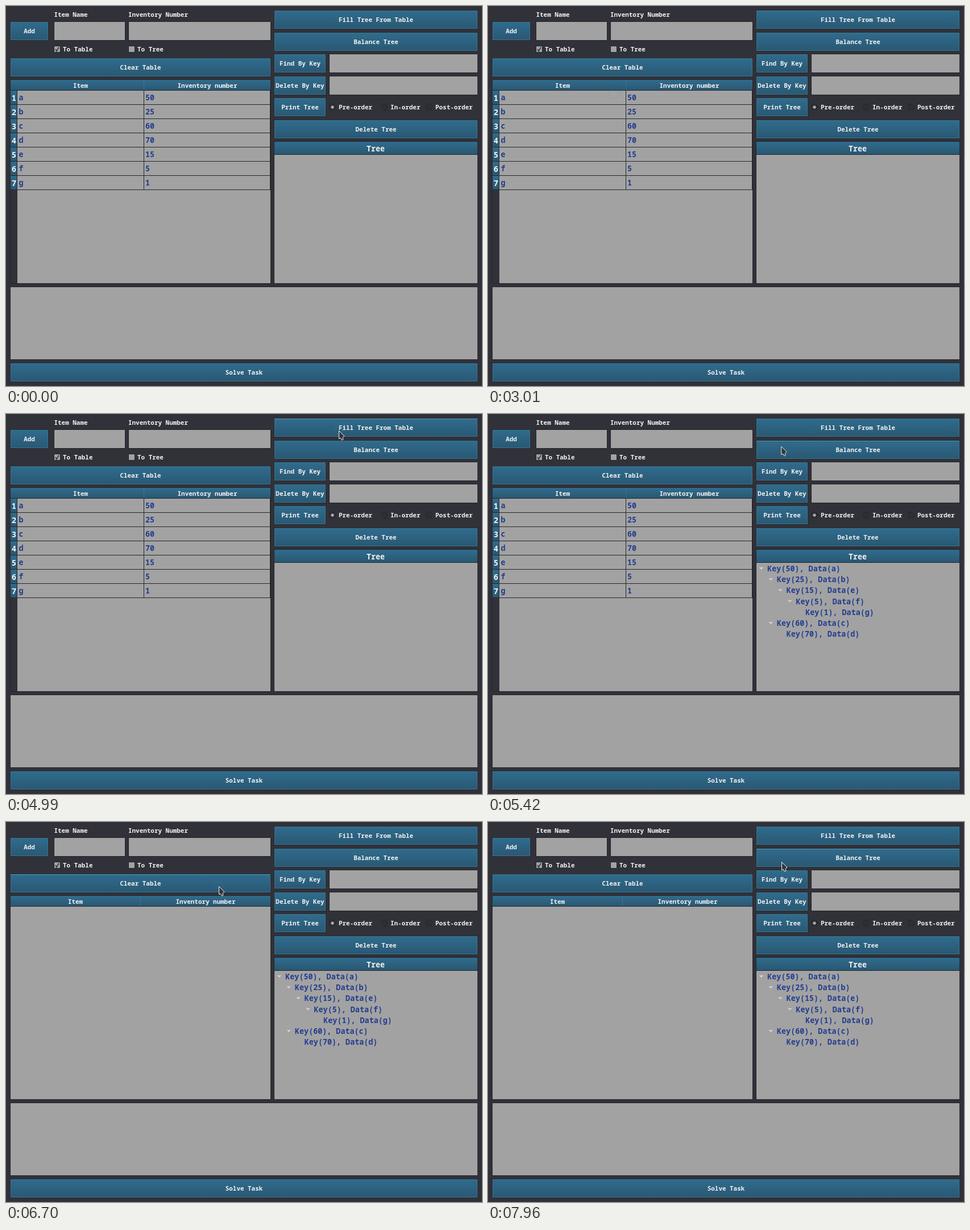
An HTML page with a canvas for the animation above (8 s loop, 837 by 669 pixels).

```html
<!DOCTYPE html>
<html lang="en">
<head>
<meta charset="utf-8">
<title>Tree table tool</title>
<style>
html, body { margin: 0; width: 100%; height: 100%; overflow: hidden; background: #313139; }
canvas { display: block; }
</style>
</head>
<body>
<canvas id="stage" width="837" height="669"></canvas>
<script>
const ctx = document.getElementById('stage').getContext('2d');
const LOOP = 8000, FILL_TIME = 5000, CLEAR_TIME = 6610;
const SMALL = 10.95, LARGE = 13.4;
const GRAY = '#a2a2a2', WHITE = '#f2f2f2', BLUE = '#233d90', DARK = '#25272c', BG = '#313139', EDGE = '#397592';

// Layout: two columns, evenly spaced rows on the right
const LEFT = 8, LEFT_END = 465, RIGHT = 472, RIGHT_END = 829, FIELD = 569, CONTROL = 32;
const rowY = i => Math.round(8 + 38.5 * i);

// Each move eases between two points, sagging by `bow`; `click` is the press before it
const moves = [
  { click: 2560, start: 2640, end: 3020, from: [222, 153], to: [601, -20], bow: 165 },
  { start: 3340, end: 3600, from: [601, -20], to: [585, 29], bow: 0 },
  { click: 4990, start: 5040, end: 6030, from: [585, 29], to: [374, 113], bow: 0 },
  { click: 6600, start: 7120, end: 7940, from: [374, 113], to: [516, 70], bow: 35 }
];

const items = [50, 25, 60, 70, 15, 5, 1].map((key, i) => ({ key, name: 'abcdefg'[i] }));

function insert(node, item) {
  if (!node) return { item };
  const side = item.key < node.item.key ? 'less' : 'more';
  node[side] = insert(node[side], item);
  return node;
}
const root = items.reduce(insert, null);

function pointerAt(t) {
  const move = moves.filter(m => m.start <= t).pop();
  if (!move) return null;
  const { start, end, from, to, bow } = move;
  const u = Math.min(1, (t - start) / (end - start));
  const k = u * u * (3 - 2 * u);
  return [
    from[0] + (to[0] - from[0]) * k,
    from[1] + (to[1] - from[1]) * k + bow * Math.sin(Math.PI * k)
  ];
}

// Share of the last 100 ms spent over the area
function hoverLevel(x, y, w, h, t) {
  let level = 0;
  for (let ago = 0; ago <= 100; ago += 25) {
    const p = pointerAt(t - ago);
    if (p && p[0] >= x && p[0] < x + w && p[1] >= y && p[1] < y + h) level += 0.2;
  }
  return level;
}

function rect(x, y, w, h, color) {
  ctx.fillStyle = color;
  ctx.fillRect(x, y, w, h);
}

function text(str, x, y, size = SMALL, color = WHITE, align = 'left') {
  ctx.font = `bold ${size}px "Noto Sans Mono", monospace`;
  ctx.textAlign = align;
  ctx.fillStyle = color;
  ctx.fillText(str, x, y + size * 0.357);
}

function bluePanel(x, y, w, h) {
  const g = ctx.createLinearGradient(0, y, 0, y + h);
  g.addColorStop(0, '#306c8d');
  g.addColorStop(1, '#295873');
  rect(x, y, w, h, g);
}

function box(x, y, right, bottom) {
  rect(x - 1, y - 1, right - x + 2, bottom - y + 2, DARK);
  rect(x, y, right - x, bottom - y, GRAY);
}

const field = (x, y, right) => box(x, y, right, y + CONTROL);

function disc(x, y, r, color) {
  ctx.beginPath();
  ctx.arc(x, y, r, 0, 7);
  ctx.fillStyle = color;
  ctx.fill();
}

function button(label, x, y, right, t, lit = false) {
  const w = right - x, h = CONTROL;
  rect(x - 1, y - 1, w + 2, h + 2, '#292b31');
  bluePanel(x, y, w, h);
  ctx.strokeStyle = EDGE;
  ctx.lineWidth = 1;
  ctx.strokeRect(x + 0.5, y + 0.5, w - 1, h - 1);
  const level = lit ? 1 : hoverLevel(x, y, w, h, t);
  rect(x, y, w, 1, `rgba(100,170,205,${level * 0.7})`);
  text(label, x + w / 2, y + h / 2, SMALL, WHITE, 'center');
}

function checkbox(label, x, checked) {
  box(x, 71, x + 10, 81);
  if (checked) {
    ctx.strokeStyle = DARK;
    ctx.lineWidth = 1.5;
    ctx.stroke(new Path2D(`M${x + 2} 76l2 3.5l4-7`));
  }
  text(label, x + 15, 76);
}

function radio(label, x, chosen) {
  disc(x, 178, 6, '#27282d');
  disc(x, 178, 5, '#2e2e35');
  if (chosen) disc(x, 178, 2.6, '#b0b0b0');
  text(label, x + 11, 178);
}

function drawTable(cleared) {
  const split = cleared ? 236 : 242, textLeft = cleared ? LEFT : 20;
  box(LEFT, 130, LEFT_END, 488);
  bluePanel(LEFT, 130, LEFT_END - LEFT, 18);
  rect(LEFT, 148, LEFT_END - LEFT, 1, DARK);
  rect(split, 131, 1, 17, EDGE);
  text('Item', (textLeft + split) / 2, 140, SMALL, WHITE, 'center');
  text('Inventory number', (split + LEFT_END) / 2 + 0.5, 140, SMALL, WHITE, 'center');
  if (cleared) return;
  rect(LEFT, 149, 12, 339, BG);
  items.forEach(({ name, key }, i) => {
    const top = 149 + i * 25, mid = top + 12.7;
    bluePanel(LEFT, top, 11, 24);
    rect(LEFT, top + 24, LEFT_END - LEFT, 1, DARK);
    text(i + 1, 14, mid + 0.5, 14, WHITE, 'center');
    text(name, 22.5, mid, LARGE, BLUE);
    text(key, 245, mid, LARGE, BLUE);
  });
  for (const x of [19, split, LEFT_END - 1]) rect(x, 149, 1, items.length * 25, DARK);
}

// Draws a subtree and returns the next free row
function drawNode(node, depth, row) {
  if (!node) return row;
  const x = 491.3 + depth * 16.75, y = 272 + row * 19.25;
  text(`Key(${node.item.key}), Data(${node.item.name})`, x, y, LARGE, BLUE);
  if (node.less || node.more) {
    ctx.fillStyle = '#d4d4d4';
    ctx.fill(new Path2D(`M${x - 14.5} ${y - 2}h7.5l-3.7 3.7z`));
  }
  return drawNode(node.more, depth + 1, drawNode(node.less, depth + 1, row + 1));
}

function drawTree(filled) {
  box(RIGHT, 239, RIGHT_END, 488);
  bluePanel(RIGHT, 239, RIGHT_END - RIGHT, 22);
  rect(RIGHT, 261, RIGHT_END - RIGHT, 1, DARK);
  text('Tree', 650, 251, LARGE, WHITE, 'center');
  if (filled) drawNode(root, 0, 0);
}

function drawRipples(t) {
  for (const { click, from } of moves) {
    const p = (t - click) / 700;
    if (!(p >= 0 && p <= 1)) continue;
    ctx.beginPath();
    ctx.arc(...from, 7 + 5 * p, 0, 7);
    ctx.strokeStyle = `rgba(52,125,165,${0.45 * (1 - p)})`;
    ctx.lineWidth = 1;
    ctx.stroke();
  }
}

const arrow = new Path2D('M0 0V14L3 13L5 16.5L7.5 15.5L6.5 12L9.5 9.5Z');

function drawPointer(t) {
  const p = pointerAt(t);
  if (!p) return;
  ctx.save();
  ctx.translate(p[0] + 0.5, p[1] + 0.5);
  ctx.fillStyle = '#33383d';
  ctx.fill(arrow);
  ctx.strokeStyle = '#eeeeee';
  ctx.lineWidth = 1;
  ctx.lineJoin = 'round';
  ctx.stroke(arrow);
  ctx.restore();
}

function drawLeft(t) {
  text('Item Name', 84.5, 15);
  text('Inventory Number', 215, 15);
  button('Add', LEFT, 28, 74, t);
  field(85, 28, 209);
  field(216, 28, LEFT_END);
  checkbox('To Table', 85, true);
  checkbox('To Tree', 216, false);
  button('Clear Table', LEFT, 92, LEFT_END, t, t >= 560 && t < 1040);
  drawTable(t >= CLEAR_TIME);
}

function drawRight(t) {
  button('Fill Tree From Table', RIGHT, rowY(0), RIGHT_END, t);
  button('Balance Tree', RIGHT, rowY(1), RIGHT_END, t);
  ['Find By Key', 'Delete By Key', 'Print Tree'].forEach((label, i) => button(label, RIGHT, rowY(i + 2), 562, t));
  field(FIELD, rowY(2), RIGHT_END);
  field(FIELD, rowY(3), RIGHT_END);
  radio('Pre-order', 574, true);
  radio('In-order', 665, false);
  radio('Post-order', 744, false);
  button('Delete Tree', RIGHT, rowY(5), RIGHT_END, t);
  drawTree(t >= FILL_TIME);
}

function draw(t) {
  rect(0, 0, 837, 669, BG);
  drawLeft(t);
  drawRight(t);
  box(LEFT, 495, RIGHT_END, 622);
  button('Solve Task', LEFT, 629, RIGHT_END, t);
  drawRipples(t);
  drawPointer(t);
}

const startTime = performance.now();
function tick() {
  draw((performance.now() - startTime) % LOOP);
  requestAnimationFrame(tick);
}
tick();
</script>
</body>
</html>
```
